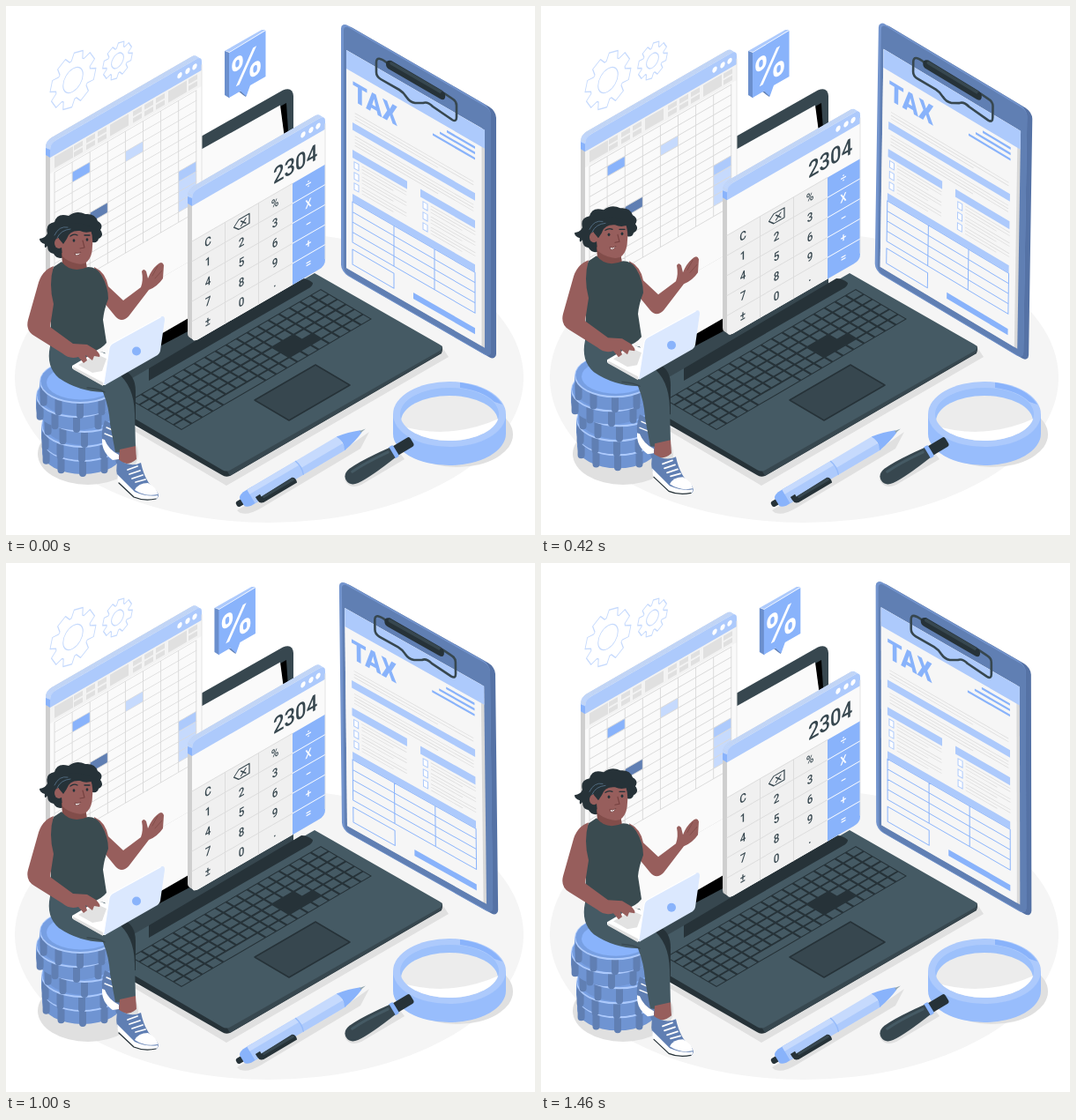
These frames come from a looping animation (600x600 px, 1.5 s). An HTML page:

```html
<!DOCTYPE html>
<html lang="en">
<head>
<meta charset="utf-8">
<title>Tax calculation</title>
<style>
html, body { margin: 0; width: 100%; height: 100%; overflow: hidden; background: #fff; }
svg { display: block; width: 100vw; height: 100vh; }
text { font-family: Roboto, "Liberation Sans", sans-serif; }
text.sign { font-family: Inter, "Liberation Sans", sans-serif; }
</style>
</head>
<body>
<svg id="stage" viewBox="0 0 600 600"></svg>
<script>
const BLUE = '#89b3fb', LIGHT = '#adcafc', PALE = '#c6dafd', NAVY = '#607fb3';
const INK = '#263238', SLATE = '#37474f', STEEL = '#455a64', SHADE = '#e0e0e0';
const SKIN = '#975e5c', DEEP = '#824d4a', CLOTH = '#3a4b50';

// Markup helpers
const path = (d, fill, more = '') => `<path d="${d}" fill="${fill}" ${more}/>`;
const line = (d, color, w = 1, more = '') => path(d, 'none', `stroke="${color}" stroke-width="${w}" stroke-linecap="round" stroke-linejoin="round" ${more}`);
const rect = (x, y, w, h, fill, more = '') => `<rect x="${x}" y="${y}" width="${w}" height="${h}" fill="${fill}" ${more}/>`;
const oval = (x, y, rx, ry, fill, more = '') => `<ellipse cx="${x}" cy="${y}" rx="${rx}" ry="${ry}" fill="${fill}" ${more}/>`;
const group = (body, move = '', id = '') => `<g ${id && `id="${id}"`} ${move && `transform="${move}"`}>${body}</g>`;
const wall = (x, y, deg, body) => group(body, `translate(${x} ${y}) skewY(${deg})`);
const label = (x, y, s, size, fill, weight = 500, anchor = 'middle', cls = '') =>
  `<text class="${cls}" transform="translate(${x} ${y}) scale(.866 1)" font-size="${size}" font-weight="${weight}" fill="${fill}" text-anchor="${anchor}">${s}</text>`;
const range = (n, f) => Array.from({ length: n }, (_, i) => f(i)).join('');

function gear(x, y, R, root, hole) {
  let d = '';
  for (let i = 0; i < 8; i++) {
    [[-.34, root], [-.2, R], [.2, R], [.34, root]].forEach(([a, r]) => {
      const q = i * Math.PI / 4 + a + .25;
      d += `${d ? 'L' : 'M'}${(r * Math.cos(q)).toFixed(1)} ${(r * Math.sin(q)).toFixed(1)}`;
    });
  }
  return group(line(d + 'Z', PALE, 1.2) + oval(0, 0, hole, hole, 'none', `stroke="${PALE}" stroke-width="1.2"`),
    `matrix(.866 -.5 0 1 ${x} ${y})`);
}

// Browser-like window with a thick left and top edge
function pane(x, y, w, h, body) {
  const bar = `M0 16V7Q0 0 7 0H${w - 7}Q${w} 0 ${w} 7V16Z`;
  const edge = range(6, i => {
    const k = 1 - i / 5;
    return group(rect(0, 0, w, h, '#cfcfcf', 'rx="7"') + path(bar, '#bfd6fd'), `translate(${-5 * k} ${-5.9 * k})`);
  });
  const dots = [25, 16, 8].map(d => oval(w - d, 7.6, 2.7, 3.1, '#fff')).join('');
  return wall(x, y, -30, edge + path('M-5 2L0 7V16L-5 10Z', BLUE) + rect(0, 0, w, h, '#fafafa', 'rx="7"') +
    body + path(bar, LIGHT) + dots + line(`M${w} 10V${h - 8}`, '#e3e3e3'));
}

function sheet() {
  const top = 35.5, row = 11.5;
  const cell = (c, r, n, fill) => rect(5 + c * 20.1, top + r * row, 20.1, row * n, fill);
  const small = [27, 41, 54, 94, 107, 120, 157].map(x => rect(x, 18, 10, 5.5, SHADE) + rect(x, 25.5, 10, 5.5, SHADE)).join('');
  const tools = rect(0, 14, 172, 20, '#f3f3f3') + small + [5, 68, 134].map(x => rect(x, 18, 21, 13, SHADE)).join('');
  const cells = cell(1, 1, 1, BLUE) + cell(4, 2, 1, PALE) + cell(2, 6, 1, NAVY) + cell(7, 7, 1, LIGHT) + cell(7, 8, 3, PALE);
  const grid = range(13, i => `M5 ${top + i * row}H166`) + range(9, i => `M${5 + i * 20.1} ${top}V${top + 12 * row}`);
  return pane(50, 156, 172, 225, tools + cells + line(grid, '#d9d9d9', .9));
}

function calculator() {
  const keys = ['C', '', '%', '÷', '1', '2', '3', 'X', '4', '5', '6', '−', '7', '8', '9', '+', '±', '0', '.', '='];
  const marks = keys.map((k, i) => {
    const c = i % 4;
    return label(18 + c * 38, 71.3 + (i >> 2) * 22.6, k, 13.5, c > 2 ? '#fff' : SLATE);
  }).join('');
  const erase = line('M47.5 67.5L53 62H65V73H53Z', SLATE, 1.2) + line('M55.5 65L61 70.5M61 65L55.5 70.5', SLATE, 1.2);
  const rows = [1, 2, 3, 4].map(i => 56 + i * 22.7);
  const body = path('M0 56H114V171H7Q0 171 0 164Z', '#f0f0f0') + path('M114 56H151V164Q151 171 144 171H114Z', BLUE) +
    line(rows.map(y => `M0 ${y}H114`).join('') + 'M0 56H114M37.5 56V171M75.5 56V171', '#dcdcdc') +
    line(rows.map(y => `M114 ${y}H151`).join(''), '#fff') + marks + erase + label(92, 44.5, '2304', 25.5, SLATE, 500, 'start');
  return pane(211, 211, 151, 171, body);
}

function laptop() {
  const keys = range(6, r => range(18, c => {
    const gap = (r === 3 || r === 4) && (c === 5 || c === 6) || r === 4 && c === 4;
    const joined = r === 5 && c > 9 && c < 14;
    return gap || joined ? '' : rect((c + .09) / 18, (r + .1) / 6, .82 / 18, .8 / 6, STEEL);
  })) + rect(10.09 / 18, 5.1 / 6, 3.82 / 18, .8 / 6, STEEL);
  const screen = path('M110 211L314 95.5Q325 91 326 102V330L110 452Z', SLATE) +
    path('M110 226L318 110L327 250V305L110 420Z', '#000') +
    path('M110 225L311 112.5L316 150V291L110 410Z', '#fafafa');
  return path('M120 467L250 544L502 398L494 386L250 520Z', SHADE) + screen +
    path('M105 444L250 526L494 385Q496 388 494 394L254 533Q249 535 245 532L105 452Z', INK) +
    path('M250 526L494 386Q496 390 493 394L254 533Z', SLATE) +
    path('M105 444L350 303L492 384Q497 387 492 391L255 526Q250 529 245 526Z', STEEL) +
    path('M162 411L335 309Q342 309 348 314Q348 318 342 321L162 425Z', INK) +
    group(rect(0, 0, 1, 1, INK) + keys, 'matrix(-216 126 58 34 357 321)') +
    path('M351 407L390 430L321 470L282 447Z', SLATE, `stroke="${INK}" stroke-width="1.5" stroke-linejoin="round"`);
}

function bubble() {
  return path('M248 51L290 27L294.5 27L253.5 52Z', LIGHT) + path('M248 51L253.5 53V104.5L248 101Z', '#6b8fcd') +
    path('M264 97L269 101L272 103L274 96Z', NAVY) +
    path('M253 53L294.5 28V80L277 90L272.5 102.5L266 96.5L253 104Z', BLUE) +
    wall(272.6, 68, -30, label(0, 16.5, '%', 45, '#fff', 700, 'middle', 'sign'));
}

function clipboard() {
  const board = rect(-6, 0, 171, 284, '#5572a5', 'rx="8"');
  const bar = (x, y, w, h = 8.5) => rect(x, y, w, h, LIGHT);
  const grays = (x, y, w, n, gap = 3.6) => line(range(n, i => `M${x} ${y + i * gap}H${x + w - (i === n - 1 ? w * .3 : 0)}`), '#dedede', .9);
  const checks = [7, 85].map(x => [0, 1, 2].map(i =>
    rect(x + 2, 121.5 + i * 12, 5, 7.5, '#fff', `stroke="${LIGHT}" stroke-width="1"`) +
    grays(x + 11, 121.5 + i * 12, 50, 3)).join('')).join('');
  const cells = range(5, i => `M7 ${168 + i * 11.5}H146`) + 'M7 168V214M54 168V214M100 168V214M146 168V214M7 222H54V239H7Z';
  const paper = rect(0, 0, 157, 247, '#d8d8d8') + rect(0, 0, 153.5, 247, '#f6f6f6') + rect(0, 0, 157, 21, LIGHT) +
    label(7, 53, 'TAX', 31, BLUE, 900, 'start') +
    [0, 1, 2].map(i => rect(114 - i * 8, 25 + i * 6.3, 32 + i * 8, 2.6, BLUE)).join('') +
    grays(10, 66, 134, 3) + bar(7, 78, 139) + grays(10, 92, 134, 4) + bar(7, 109, 62, 9) + bar(84, 109, 62, 9) +
    checks + bar(7, 159, 139) + line(cells, BLUE, 1, 'stroke-linecap="butt"') + rect(76, 231, 70, 7, BLUE);
  const wire = 'M433 65Q420 55 420 64V75Q420 80 425 83L446 95Q451 98 454 103Q458 109 464 110L473 110Q478 108 484 114L506 129Q511 132 511 126V113Q511 108 506 105L497 99';
  return wall(391, 23.5, 30, board) + wall(386, 21, 30, rect(-6, 0, 170, 284, '#7394cd', 'rx="8"') + rect(-3, 2, 167, 281, NAVY, 'rx="6"')) +
    wall(386, 50, 30, paper) + line(wire, SLATE, 2.6) +
    path('M431 66Q431 61 437 62L495 96Q499 99 498 104Q497 108 492 105L435 72Q431 70 431 66Z', INK) +
    line('M437 65L494 98', SLATE, 3.5) + oval(495, 101, 2.2, 4, INK);
}

function coin(x, y) {
  const side = `M${x - 46} ${y}V${y + 14}A46 25 0 0 0 ${x + 46} ${y + 14}V${y}Z`;
  const panels = range(5, i => {
    const a = Math.PI * (i + .8) / 5.6, px = x + 46 * Math.cos(a), py = y + 25 * Math.sin(a);
    return `M${px.toFixed(1)} ${(py - 1).toFixed(1)}v14`;
  });
  return path(side, '#6f94d2') + line(panels, NAVY, 8, 'stroke-linecap="butt"') +
    oval(x, y, 46, 25, LIGHT) + oval(x, y - .6, 44.8, 23.6, '#779fe2') + oval(x + 1, y + 1, 39, 19.5, BLUE);
}

function woman() {
  const coins = [[87, 492], [86, 476], [89, 459], [80, 442], [84, 426]].map(p => coin(...p)).join('');
  const backShoe = path('M112 470Q106 487 111 500L122 514L132 516V480Z', NAVY) +
    path('M109 491Q108 506 121 515L128 514V509Q116 503 112 492Z', '#fff') + line('M114 478L123 482M112 485L122 489', '#fff', 1.4);
  const shoe = path('M129 503L128 516Q138 523 148 514L147 499Z', SKIN) +
    path('M127 514Q123 529 128 537L146 555Q158 562 171 559Q175 555 170 549Q158 541 153 518Q141 524 127 514Z', NAVY) +
    path('M126 531L146 551Q160 557 172 555Q173 559 167 560Q153 561 144 555L127 539Z', '#fff') +
    path('M146 549Q150 541 161 541Q172 547 172 554Q158 557 146 549Z', '#fff') +
    line('M138 526L149 522M140 531L152 527M143 536L155 532M147 540L158 537', '#fff', 1.8) +
    line('M128 541L145 557Q157 562 170 559', INK, 1.2);
  const legs = path('M112 414L132 412Q147 418 147 437V470H128Z', INK) + backShoe +
    path('M50 386Q45 409 60 422Q82 437 110 438Q117 455 118 474L124 506Q137 508 147 502L146 462Q145 430 126 416L112 393Z', STEEL) +
    line('M112 438Q106 434 92 433', SLATE, 1.3);
  const hair = path('M47 272Q43 277 44 270Q38 268 38 264Q45 263 47 258Q44 247 55 245Q58 234 71 238Q80 231 90 236Q101 235 104 244Q111 248 107 254Q112 260 105 264Q104 269 98 268L92 256L70 262L66 285Q58 288 54 281Q47 280 47 272Z', INK);
  const face = path('M63 280L64 293Q74 305 92 298L90 286Z', DEEP) +
    path('M62 262Q66 251 78 253L96 254Q99 262 98 272Q98 284 92 290Q88 294 80 292Q70 290 64 284Z', SKIN) + oval(60, 269, 5, 6, SKIN) +
    path('M60 264Q60 249 76 246Q92 246 101 254Q92 259 84 255Q72 254 69 264L65 270Z', INK) +
    line('M55 260Q60 249 70 251M58 263Q62 254 73 253', '#5a7690', .8) +
    oval(77, 266, 1.4, 1.8, INK) + oval(92, 265, 1.4, 1.8, INK) + line('M73 261Q77 258 81 260M89 260L95 260', INK, 1.3) +
    line('M87 266L89 274L84 275', '#74403f', 1.1) + path('M78 280Q81 282 85 279Q83 284 79 283Z', '#fff', 'stroke="#74403f" stroke-width=".9"');
  const farArm = path('M100 296Q113 302 116 318L133 334L153 319Q156 311 154 301Q156 297 159 301L161 309Q165 299 171 294Q177 288 179 294L178 309Q172 318 162 322L139 352Q131 360 124 352L106 330Z', SKIN) +
    line('M166 306L172 295M169 309L177 300', DEEP, .9);
  const top = path('M54 296L63 290Q74 304 93 296Q103 296 108 305Q116 318 116 332Q111 345 110 356L114 382Q100 400 50 396L50 370Q53 350 48 330Q47 308 54 296Z', CLOTH);
  const nearArm = path('M54 295Q40 300 36 317L25 356Q22 368 32 374L64 394Q72 401 82 398L88 405L92 402L90 396L98 402L100 397L106 398Q108 396 102 390L92 384L76 383L50 364L54 338Q48 316 54 295Z', SKIN);
  const pc = path('M75 408L104 391L120 397L113 430L109 430L75 411Z', '#fff') + path('M82 407L103 395L114 400L109 414L98 416Z', '#e2e2e2') +
    path('M76 409L110 427V431L76 412Z', SHADE) +
    path('M111 427L117 388Q118 384 122 382L175 353Q180 350 180 356L175 391Q174 395 170 397L114 429Q110 431 111 427Z', '#dbe8fe') +
    line('M111 427L117 388Q118 384 122 382L175 353', '#fff', 1.2) + oval(148, 391.5, 5, 5, BLUE);
  return coins + hair + face + farArm + top + legs + shoe + pc + nearArm;
}

function pen() {
  return path('M262 572L392 497L412 483L402 502L290 569Q270 581 262 572Z', SHADE) +
    group(rect(-4, -3.5, 12, 7, INK, 'rx="3"') + path('M3 -5Q4 -8 10 -9H22V9H10Q4 8 3 5Z', BLUE) +
      rect(15, -9, 65, 18, LIGHT) + rect(15, -9, 65, 6, PALE) + rect(80, -9, 55, 18, PALE) + rect(80, 1, 55, 8, LIGHT) +
      line('M79 -8.5Q82 0 79 8.5', '#95bafa', 1.5) + path('M133 -9Q147 -7 160 -1.5V1.5Q147 7 133 9Q138 0 133 -9Z', BLUE) +
      path('M159 -1.2L166 0L159 1.2Z', '#90a4ae') + path('M19 3L25 3V6L66 5Q70 7 68 13H24Q19 12 19 7Z', INK) + rect(26, 6, 41, 3, SLATE, 'rx="1.5"'),
      'translate(265 564) rotate(-30.6)');
}

function lens() {
  const body = 'M439 463V485A64 36 0 0 0 567 485V463Z';
  const handle = rect(56, -6, 25, 12, INK, 'rx="3"') + rect(54, -7.5, 6, 15, BLUE, 'rx="2"') +
    path('M4 -9.5Q20 -11 55 -6.5V6.5Q20 11 4 9.5Q-6 8 -6 0Q-6 -8 4 -9.5Z', SLATE) + line('M5 -5Q25 -6 51 -3', STEEL, 3);
  return oval(512, 486, 63, 37, SHADE) + path('M384 537Q389 549 403 543L452 514L446 506Z', SHADE) +
    path(body, '#98bdfc') + oval(503, 463, 64, 37, LIGHT) +
    oval(503, 463, 56, 30, '#9cc0fb') + path('M515 427Q550 432 563 452L554 449Q540 436 515 433Z', BLUE) +
    `<clipPath id="hole"><ellipse cx="503" cy="463" rx="56" ry="30"/></clipPath><g clip-path="url(#hole)">` +
    oval(503, 471, 55, 29, '#ececec') + path('M447 476Q503 493 559 468V500H447Z', '#fff') + '</g>' +
    group(handle, 'translate(391 535) rotate(-31)');
}

document.getElementById('stage').innerHTML =
  oval(298.5, 421.5, 288.5, 164.5, '#f5f5f5') + gear(76, 84, 30, 22.5, 13) + gear(126.5, 62, 19.5, 14.5, 8) +
  oval(93, 508, 57, 35, SHADE) + laptop() + group(sheet(), '', 'sheet') + group(calculator(), '', 'calc') +
  group(bubble(), '', 'bubble') + group(clipboard(), '', 'board') + lens() + pen() + group(woman(), '', 'woman');

// CSS "ease" curve
function ease(x) {
  let lo = 0, hi = 1, s = x;
  for (let i = 0; i < 24; i++) {
    s = (lo + hi) / 2;
    const px = .75 * s * (1 - s) ** 2 + .75 * s * s * (1 - s) + s ** 3;
    if (px < x) lo = s; else hi = s;
  }
  return .3 * s * (1 - s) ** 2 + 3 * s * s * (1 - s) + s ** 3;
}

const LOOP = 1500, STEPS = 36, shake = [0, -1, 2, -4, 4, -4, 4, -4, 2, -1, 0];
const move = (id, t) => document.getElementById(id).setAttribute('transform', t);

function draw(ms) {
  // 24 pictures per second, each starting on the nearest 10 ms
  const p = Math.floor((ms % LOOP + 5) / (LOOP / STEPS)) % STEPS / STEPS;
  const lift = -12 * (1 - Math.abs(1 - 2 * p));
  ['sheet', 'calc', 'woman'].forEach(id => move(id, `translate(0 ${lift})`));
  const turn = p < .25 ? 4 * p : p < .75 ? 2 - 4 * p : 4 * p - 4;
  move('board', `rotate(${turn} 468 210)`);
  const i = Math.floor(p * 10), k = ease(p * 10 - i);
  move('bubble', `translate(${3.4 * (shake[i] + (shake[i + 1] - shake[i]) * k)} 0)`);
}

let start;
function tick(now) {
  start ??= now;
  draw(now - start);
  requestAnimationFrame(tick);
}
draw(0);
requestAnimationFrame(tick);
</script>
</body>
</html>
```
